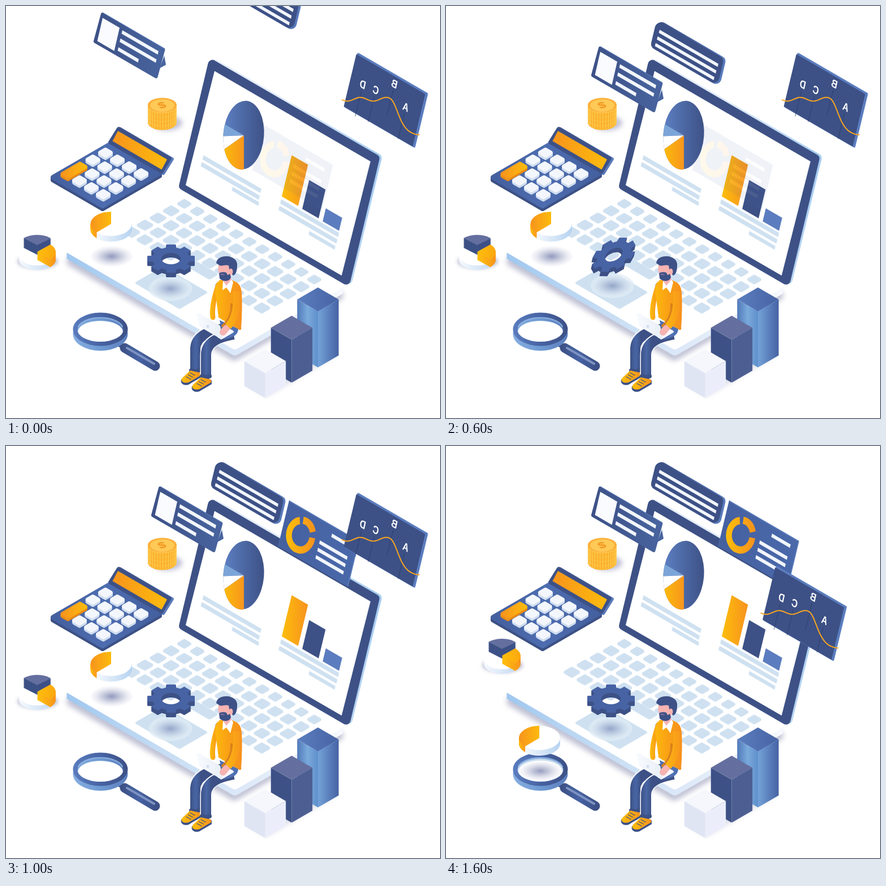
An HTML page with a canvas that plays this animation: 768 by 729 pixels, repeating every 1800 ms.

```html
<!DOCTYPE html>
<html lang="en">
<head>
<meta charset="utf-8">
<title>Isometric analytics desk</title>
<style>
html, body { margin: 0; width: 100%; height: 100%; overflow: hidden; background: #fff; }
canvas { display: block; }
</style>
</head>
<body>
<canvas id="stage" width="768" height="729"></canvas>
<script>
const stage = document.getElementById('stage');
let g = stage.getContext('2d');
const NAVY = '#3d5186', BLUE = '#4763a4', SKY = '#5b7dbf', PALE = '#cfe1f1', INK = '#f1f5fc',
      AMBER = '#fdbb0c', ORANGE = '#f7941d', SKIN = '#f7b3b1';
const STEP = 200, STEPS = 9, TAU = Math.PI * 2, SLOPE = .58;

function lin(x0, y0, x1, y1, ...colors) {
  const fill = g.createLinearGradient(x0, y0, x1, y1);
  colors.forEach((c, i) => fill.addColorStop(i / (colors.length - 1), c));
  return fill;
}
const across = (x0, x1, ...colors) => lin(x0, 0, x1, 0, ...colors);
const gold = (x0, x1) => across(x0, x1, AMBER, ORANGE);

// Closed polygon; the corner radius is shared or given per corner.
function poly(fill, pts, r = 0) {
  const n = pts.length, at = i => pts[i % n];
  g.beginPath();
  g.moveTo((at(0)[0] + at(n - 1)[0]) / 2, (at(0)[1] + at(n - 1)[1]) / 2);
  for (let i = 0; i < n; i++) g.arcTo(...at(i), ...at(i + 1), r[i] ?? r);
  g.closePath();
  g.fillStyle = fill;
  g.fill();
}
// Upright panel from its top left corner, and flat plate from its left corner.
function wall(fill, x, y, w, h, lean = .24, r = 0) {
  const d = w * SLOPE;
  poly(fill, [[x, y], [x + w, y + d], [x + w - h * lean, y + d + h], [x - h * lean, y + h]], r);
}
function plate(fill, x, y, back, front, r = 0) {
  const up = back * SLOPE, down = front * SLOPE;
  poly(fill, [[x, y], [x + back, y - up], [x + back + front, y - up + down], [x + front, y + down]], r);
}
function shape(fill, d) { g.fillStyle = fill; g.fill(new Path2D(d)); }
function line(color, width, d, cap = 'round') {
  g.strokeStyle = color; g.lineWidth = width; g.lineCap = cap; g.lineJoin = 'round';
  g.stroke(new Path2D(d));
}
function oval(fill, x, y, rx, ry, a = 0, b = TAU) {
  g.beginPath();
  if (b - a < TAU) g.moveTo(x, y);
  g.ellipse(x, y, rx, ry, 0, a, b);
  g.fillStyle = fill;
  g.fill();
}
function ring(fill, x, y, rx, ry, dy, innerX, innerY) {
  g.beginPath();
  g.ellipse(x, y, rx, ry, 0, 0, TAU);
  g.ellipse(x, y + dy, innerX, innerY, 0, 0, TAU);
  g.fillStyle = fill;
  g.fill('evenodd');
}
function moved(dx, dy, draw) { g.save(); g.translate(dx, dy); draw(); g.restore(); }
function shadow(px, draw) { g.save(); g.filter = `blur(${px}px)`; draw('rgba(80,85,135,.36)'); g.restore(); }

// Stacks a flat shape downwards to give it thickness.
function extrude(h, side, top, draw, dx = 0) {
  for (let d = h; d > 0; d--) moved(dx * d / h, d, () => draw(side));
  draw(top);
}
function glyph(text, size, color, ...matrix) {
  g.save();
  g.transform(...matrix);
  g.fillStyle = color;
  g.font = `bold ${size}px "Liberation Sans", Arial, sans-serif`;
  g.textAlign = 'center';
  g.textBaseline = 'middle';
  g.fillText(text, 0, 0);
  g.restore();
}
function softSpot(x, y, rx, ry, rgb, strength) {
  g.save();
  g.translate(x, y);
  g.scale(1, ry / rx);
  const fill = g.createRadialGradient(0, 0, 0, 0, 0, rx);
  for (let t = 0; t <= 1; t += .25) fill.addColorStop(t, `rgba(${rgb},${strength * (1 - t) ** 1.3})`);
  oval(fill, 0, 0, rx, rx);
  g.restore();
}
function stripes(fill, count, x, y, dx, dy, w, h) {
  for (let i = 0; i < count; i++) wall(fill, x + i * dx, y + i * dy, w, h);
}

function keyboard() {
  for (let row = 0; row < 5; row++) for (let col = 0; col < 11; col++) {
    if (row === 4 && col > 3 && col < 7) continue;
    const w = row ? 17.5 : 15.5, side = w / 2;
    plate(PALE, 315.5 + col * 23 - row * 23.2 - w, 350 + col * 13.4 + row * 12.6, w, w, 3);
  }
  plate(PALE, 311, 456, 17, 49, 3);
  plate(PALE, 227, 490, 51, 80, 2);
}

function screenPie() {
  g.save();
  g.beginPath();
  g.ellipse(420.5, 228.5, 36, 61, .08, 0, TAU);
  g.clip();
  const paint = (fill, from, to) => oval(fill, 421, 229, 90, 90, from, to);
  paint(across(388, 457, SKY, NAVY), 0, TAU);
  paint('#7aa5d8', 3.1, 3.67);
  paint('#fff', 2.53, 3.1);
  paint(gold(385, 422), TAU / 4, 2.53);
  g.restore();
}

function laptop() {
  shadow(5, c => plate(c, 99, 452, 201, 305, 8));
  const rounding = [0, 9, 9, 9];
  extrude(11, across(108, 600, '#9fc7ee', '#c5dcf4', '#dfeaf8', '#f6f9fd'), '#fff',
    fill => plate(fill, 107, 436, 201, 298, rounding));
  keyboard();
  wall(across(365, 660, '#e6eff9', '#dce9f7', '#a5cbf0'), 364, 90, 302, 232, .24, 9);
  wall(NAVY, 360, 91, 302, 231, .238, 8);
  wall('#fff', 369, 115, 276, 202, .253);

  screenPie();
  stripes(PALE, 2, 349.5, 264, -3, 12, 102.5, 7.5);
  stripes(PALE, 1, 401, 320, 0, 0, 47, 6.5);
  stripes(PALE, 2, 487, 342, -3, 11.5, 102.5, 7.5);
  stripes(PALE, 1, 537, 398, 0, 0, 46, 6.5);
  [[73, gold(490, 532)], [51, NAVY], [23, SKY]].forEach(([h, fill], i) =>
    wall(fill, 488 + i * 36.2 + h * .24, 337 + i * 22 - h, 29, h));
}

function profileCard() {
  const fill = across(155, 280, NAVY, '#48649f');
  shape(fill, 'M280 88L283 104L272 110Z');
  wall(fill, 169, 10, 113, 54, .27, 3);
  line(SKY, 1, 'M173 13L281 76');
  wall('#f9fbff', 171, 21, 30, 41, .23);
  stripes(INK, 2, 206, 43, -3.5, 14.5, 64, 6);
  stripes(INK, 1, 199, 73, 0, 0, 36, 6);
}

function chatBubble() {
  wall(across(365, 494, NAVY, SKY), 375, 23, 121, 50, .24, 10);
  wall(NAVY, 373, 24, 119, 48, .24, 10);
  stripes(INK, 3, 378, 42, -3.5, 11.7, 104, 5.5);
}

function donutCard() {
  wall('#5a7cbc', 501, 96, 124, 81);
  wall(across(485, 620, '#4560a0', '#4a69aa'), 501, 98, 122, 79);
  g.save();
  g.transform(.8, .05, -.05, 1, 521.5, 158);
  g.lineWidth = 13;
  g.strokeStyle = gold(-28, 28);
  [[.12, 4.58, 0], [4.82, 6.05, 1]].forEach(([from, to, shift]) => {
    g.beginPath();
    g.arc(shift, -shift, 26, from, to);
    g.stroke();
  });
  g.restore();
  stripes(INK, 1, 577, 155, 0, 0, 33, 6);
  stripes(INK, 3, 555.5, 167, -3.3, 13, 49, 6);
}

const cardLayer = document.createElement('canvas');
cardLayer.width = stage.width;
cardLayer.height = stage.height;
const mainContext = g;
g = cardLayer.getContext('2d');
donutCard();
g = mainContext;

function chartPanel() {
  wall(SKY, 622, 82, 125, 97, .24, 2);
  wall(NAVY, 620, 85, 122, 93, .24, 1);
  [['D', 631, 140], ['C', 654, 150], ['B', 687, 139], ['A', 707, 180]].forEach(([letter, x, y]) => {
    line('#2b3b69', .8, `M${x - 2} ${y + 10}l-11 45`);
    glyph(letter, 19, '#fff', -.74, -.4, -.22, 1, x, y);
  });
  // A gentle wave that gives way to one steep fall.
  let d = '';
  for (let x = 595; x <= 731; x += 2) {
    const fall = Math.exp(-Math.exp((694 - x) / 9));
    const wave = 3.3 * Math.cos((x - 604) * TAU / 46) * (1 - fall);
    d += `${d ? 'L' : 'M'}${x} ${165 + wave + 64 * fall}`;
  }
  line('#f9a51f', 2, d);
}

function coins() {
  shadow(4, c => oval(c, 285, 207, 27, 13));
  for (let y = 199; y >= 176; y -= 7.6) {
    extrude(7, '#fbb02c', '#ffd057', fill => oval(fill, 276.5, y, 25.5, 13.5));
    for (let a = .12; a < 3.1; a += .2)
      line('#ffd35c', 1, `M${276.5 + 25 * Math.cos(a)} ${y + 1 + 13 * Math.sin(a)}v6`);
  }
  oval('#fbae3a', 276.5, 175.5, 25.5, 13);
  oval('#ffc956', 276.5, 176, 21.5, 11);
  glyph('$', 20, '#f29420', 1.15, -.28, .45, .72, 276.5, 176.5);
}

function calculator() {
  extrude(5, NAVY, across(90, 260, '#4560a0', '#4d6db0', '#4560a0'), fill => plate(fill, 75, 303, 109, 96, 4));
  wall(across(180, 296, NAVY, SKY), 200, 213, 98, 30, .62, 3);
  wall(NAVY, 198, 213, 96, 29, .62, 3);
  wall(across(190, 284, ORANGE, AMBER), 198, 221, 87, 18, .53);
  const key = (x, y, long, side, top) => extrude(4, side, top, fill => plate(fill, x, y, long, 16.5, 3.5));
  for (let row = 0; row < 4; row++) for (let col = 0; col < 4; col++)
    if (row < 2 || col)
      key(159.5 + col * 21 - row * 22.3, 259.5 + col * 12.2 + row * 12.3, 16.5, '#cfddf0', '#f3f6fc');
  key(93, 297, 38, '#e88a16', across(98, 142, ORANGE, AMBER));
}

function smallPie() {
  shadow(3, c => oval(c, 56, 452, 36, 13));
  extrude(8, across(23, 80, '#f5f9fe', '#c7dcf3'), '#fff', fill => oval(fill, 55, 441, 32, 18));
  extrude(17, NAVY, '#646f9f', fill => oval(fill, 55, 423, 32.5, 18, -2.4, -.72));
  extrude(14, gold(60, 88), across(60, 88, AMBER, '#fca80f'), fill => oval(fill, 55, 435, 33, 18.5, -.78, .78));
}

function halfPie() {
  const disc = (from, to) => fill => oval(fill, 186, 385.5, 36.5, 21.5, from, to);
  const fill = across(150, 186, ORANGE, AMBER);
  extrude(10, across(149, 162, AMBER, ORANGE), fill, disc(2.36, TAU * .75));
  extrude(10, across(160, 223, '#f4f8fd', '#b5d2f0'), '#fff', disc(-TAU / 4, 2.36));
}

function gear(tilted) {
  const teeth = new Path2D();
  for (let k = 0; k < 8; k++) for (const [r, spread] of [[.79, -.27], [1, -.2], [1, .2], [.79, .27]]) {
    const a = k * TAU / 8 + spread;
    teeth.lineTo(42.5 * r * Math.cos(a), 25.5 * r * Math.sin(a));
  }
  teeth.closePath();
  teeth.moveTo(17, 0);
  teeth.ellipse(0, 0, 17, 10, 0, 0, TAU);
  extrude(8, NAVY, BLUE, fill => {
    g.save();
    g.translate(tilted ? 297 : 292, tilted ? 440 : 447);
    g.rotate(tilted ? -TAU / 12 : 0);
    g.fillStyle = fill;
    g.fill(teeth, 'evenodd');
    g.restore();
  }, tilted ? -2 : 0);
}
function gearShadow() {
  oval('rgba(225,237,245,.7)', 291, 500, 38.5, 22);
  softSpot(291, 500, 34, 18, '130,148,190', .8);
}

function magnifier(shaded) {
  line(NAVY, 7, 'M200 599L208 604');
  line(across(205, 265, NAVY, BLUE, NAVY), 17, 'M210 605L264 637');
  line('#7d93c3', 4, 'M214 605L262 633');
  ring(across(118, 215, '#86aee0', '#6f9ad2', SKY), 167, 580.5, 48.5, 29.5, -3.5, 40, 20);
  if (shaded) {
    oval('#c9dcef', 167, 575, 41, 22);
    oval('#fff', 167, 575, 38.5, 18.5);
    softSpot(167, 575, 39, 18, '145,151,188', .95);
  }
  ring(across(118, 215, SKY, BLUE, NAVY), 167, 572, 48.5, 29.5, 1, 40.5, 21);
  line('#8db3e2', 2, 'M128 567A40 20 0 0 1 206 567');
}

function leg() {
  line('#fff', 21, 'M372 574Q336 581 335 606V644', 'butt');
  line(across(326, 345, NAVY, '#4866a5', NAVY), 18, 'M384 571Q336 579 335 606V646', 'butt');
  line(NAVY, 8, 'M328 645Q335 649 341 645');
}
function shoe() {
  shape(NAVY, 'M310 661C308 667 314 673 323 670L345 657V650Z');
  shape(gold(312, 345), 'M326 645L344 649V654L323 666C315 668 309 665 311 659Z');
  for (let i = 0; i < 3; i++) line(NAVY, 1.4, `M${319 + i * 3.5} ${656 - i * 3.5}l8 4.5`);
}
function head() {
  shape(SKIN, 'M376 458L398 455L399 475L392 484L379 478Q374 468 376 458Z');
  shape(NAVY, 'M372 455C373 446 382 442 394 443C405 445 410 452 409 460C409 468 407 475 402 477L396 470L394 459C387 457 381 461 378 459Z');
  oval(SKIN, 398, 470, 3.5, 5.5);
  shape(NAVY, 'M377 473Q383 469 390 472L392 476L396 474L398 479C397 488 384 489 378 482Z');
  line('#d99096', 1.2, 'M380 475H386');
}

function man(typing) {
  leg();
  shoe();
  moved(19, 10, leg);
  moved(19, 12, () => {
    if (typing) { g.translate(343, 650); g.rotate(-.22); g.translate(-341, -649); }
    shoe();
  });
  shape('#4f70b3', 'M378 556L411 571C411 582 402 587 385 590Z');

  line(gold(362, 374), 9, 'M376 493Q363 530 366 551');
  shape(across(370, 418, '#fdb70d', '#f9a015', '#f7901e'),
    'M378 485C369 493 369 506 372 518L376 551L413 573H416C418 545 418 520 417 507C416 495 412 489 399 485Z');
  shape(SKIN, 'M385 480L397 476L400 489L390 499L384 493Z');
  shape('#fff', 'M384 486L390 495L399 484L402 489L397 508L390 498L383 503Z');

  plate('#f7f9fd', 372, 585, 24, 9, 2);
  wall(across(337, 381, '#f8fafd', '#e9eff8'), 337, 541, 42, 26, -.2, 2);
  oval('#d5e0ef', 357, 567, 2.5, 3);
  if (typing) {
    line(SKIN, 9, 'M376 560L388 559');
    line(gold(380, 418), 15, 'M409 502Q416 545 386 560', 'butt');
    line('#df8119', 1.2, 'M385 567Q412 560 413 544');
  } else {
    line(SKIN, 12, 'M384 577L390 570');
    line('#d97f1d', 4, 'M399 528Q401 550 383 566');
    line(gold(385, 418), 13, 'M408 505Q411 548 393 567', 'butt');
  }
  head();
}

function block(x, y, h, top, left, right) {
  const w = 36.7, d = 21.2;
  poly(left, [[x - w, y + d], [x, y + 2 * d], [x, y + 2 * d + h], [x - w, y + d + h]]);
  poly(right, [[x, y + 2 * d], [x + w, y + d], [x + w, y + d + h], [x, y + 2 * d + h]]);
  plate(top, x - w, y + d, w, w);
}
function blocks() {
  shadow(4, c => { g.globalAlpha = .5; plate(c, 425, 670, 120, 36); });
  block(552, 498, 99, across(516, 588, SKY, BLUE),
    across(515, 552, '#4f78b8', '#7aa9db', '#5f90cc'), across(552, 588, '#73a2d8', BLUE));
  block(505.5, 548, 76, '#646f9f', NAVY, '#4d5f92');
  block(458.5, 607, 44, '#f5f7fc', '#dfe5f3', '#ebeefa');
}

function render(step) {
  const tilted = step === 2 || step === 3;
  const typing = step === 6 || step === 7;
  const pieDown = step === 8;
  const place = (shifted, dx, dy, draw) => shifted ? moved(dx, dy, draw) : draw();
  g.fillStyle = '#fff';
  g.fillRect(0, 0, stage.width, stage.height);

  laptop();
  coins();
  calculator();
  if (step < 5) {
    g.globalAlpha = step < 4 ? .08 : 1;
    g.drawImage(cardLayer, -46, 113);
    g.globalAlpha = 1;
  }
  place(step >= 1, 102, 60, profileCard);
  place(step < 3, 27, -97, chatBubble);
  if (step >= 5) g.drawImage(cardLayer, 0, 0);
  place(step >= 6, -37.5, 129.5, chartPanel);
  place(step >= 7, 44, -64, smallPie);
  place(tilted, 3.5, -5, gearShadow);
  gear(tilted);
  if (!pieDown) softSpot(187, 443, 39, 19, '140,147,185', .95);
  magnifier(pieDown);
  place(pieDown, -20.5, 131, halfPie);
  blocks();
  man(typing);
}

const start = performance.now();
function tick() {
  render(Math.floor((performance.now() - start) / STEP) % STEPS);
  requestAnimationFrame(tick);
}
tick();
</script>
</body>
</html>
```
